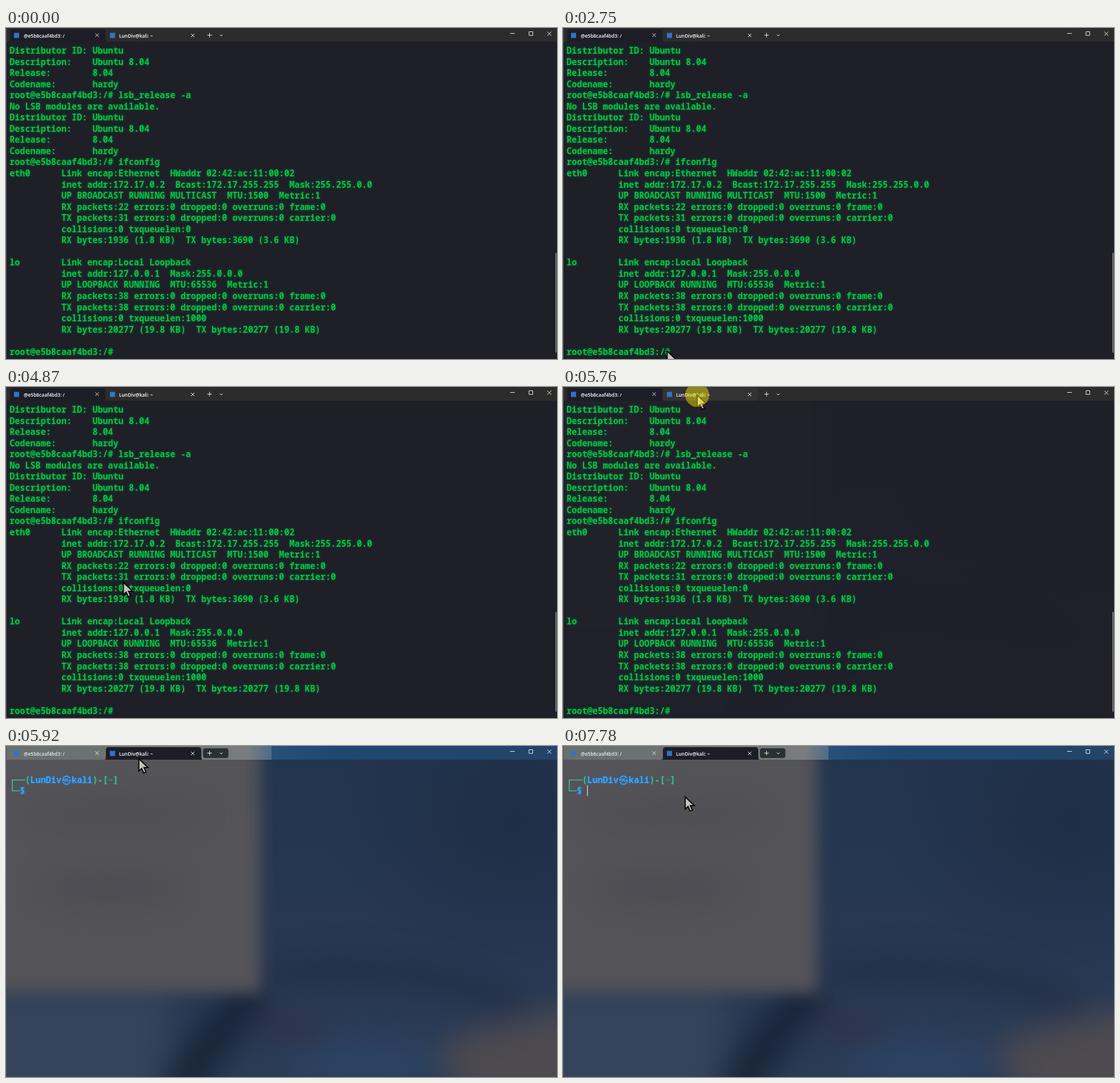
Animation, 965 px wide and 580 px high, one loop 8 s. Source, as an HTML page:

```html
<!DOCTYPE html>
<html lang="en">
<head>
<meta charset="utf-8">
<title>Terminal</title>
<style>
  html, body { margin: 0; width: 965px; height: 580px; overflow: hidden; background: #1f1f28; }
  svg, pre { position: absolute; left: 0; top: 0; margin: 0; }
  filter { color-interpolation-filters: sRGB; }
  pre {
    left: 6.2px; top: 30px; color: #04c445;
    font: bold 15.13px/19.55px "Noto Sans Mono", "DejaVu Sans Mono", monospace;
    text-shadow: 0 0 4px rgba(0, 160, 55, .6);
  }
  #kali { color: #34c88b; text-shadow: 0 0 4px rgba(40, 150, 150, .6); }
  #kali b { color: #38a8ff; text-shadow: 0 0 4px rgba(40, 130, 230, .7); }
  #kali i { font-style: normal; font-weight: 400; opacity: .75; }
  #kali .wide {
    display: inline-block; width: 18.16px; height: 19.55px; vertical-align: top; text-align: center;
    font: bold 16px/19.55px "Noto Sans CJK KR", "Noto Sans CJK JP", "Noto Sans CJK SC", sans-serif;
  }
  .tab { font: 600 8.4px "Open Sans", "Noto Sans", sans-serif; fill: #fff; }
  .line { fill: none; stroke: #f0f0f0; stroke-width: 1; }
</style>
</head>
<body>
<svg id="glass" width="965" height="580">
  <defs>
    <filter id="soft" x="-40%" y="-40%" width="180%" height="180%"><feGaussianBlur stdDeviation="26"/></filter>
    <filter id="edge" x="-20%" y="-20%" width="140%" height="140%"><feGaussianBlur stdDeviation="13"/></filter>
    <linearGradient id="sky" x2="0" y2="1">
      <stop stop-color="#22354f"/><stop offset=".6" stop-color="#283853"/><stop offset="1" stop-color="#2b3c56"/>
    </linearGradient>
    <radialGradient id="shade">
      <stop stop-color="#1d2c43" stop-opacity=".8"/><stop offset="1" stop-color="#1d2c43" stop-opacity="0"/>
    </radialGradient>
    <linearGradient id="top">
      <stop stop-color="#68706f"/><stop offset=".2" stop-color="#6e7273"/><stop offset=".44" stop-color="#7a7c7f"/>
      <stop offset=".482" stop-color="#4d6d88"/><stop offset=".482" stop-color="#27507a"/>
      <stop offset=".6" stop-color="#1f486f"/><stop offset="1" stop-color="#234468"/>
    </linearGradient>
  </defs>
  <rect width="965" height="580" fill="url(#sky)"/>
  <ellipse cx="890" cy="130" rx="330" ry="270" fill="url(#shade)"/>
  <g filter="url(#soft)">
    <rect x="-80" y="420" width="360" height="240" fill="#35445a"/>
    <ellipse cx="630" cy="560" rx="130" ry="45" fill="#2c4363"/>
    <path d="M460 400Q700 370 900 450" fill="none" stroke="#222c42" stroke-width="34"/>
    <ellipse cx="500" cy="490" rx="60" ry="25" fill="#30324a"/>
    <path d="M440 430Q370 490 295 620" fill="none" stroke="#172235" stroke-width="60"/>
    <path d="M755 530Q820 490 1040 450V660H830Z" fill="#4d4a50"/>
  </g>
  <rect x="-60" y="-60" width="506" height="492" fill="#545358" filter="url(#edge)"/>
  <g filter="url(#soft)" fill="#47484f" opacity=".6">
    <ellipse cx="180" cy="250" rx="130" ry="30"/><ellipse cx="190" cy="120" rx="160" ry="22"/>
  </g>
  <rect width="965" height="24" fill="url(#top)"/>
</svg>

<pre id="shell">Distributor ID: Ubuntu
Description:    Ubuntu 8.04
Release:        8.04
Codename:       hardy
root@e5b8caaf4bd3:/# lsb_release -a
No LSB modules are available.
Distributor ID: Ubuntu
Description:    Ubuntu 8.04
Release:        8.04
Codename:       hardy
root@e5b8caaf4bd3:/# ifconfig
eth0      Link encap:Ethernet  HWaddr 02:42:ac:11:00:02
          inet addr:172.17.0.2  Bcast:172.17.255.255  Mask:255.255.0.0
          UP BROADCAST RUNNING MULTICAST  MTU:1500  Metric:1
          RX packets:22 errors:0 dropped:0 overruns:0 frame:0
          TX packets:31 errors:0 dropped:0 overruns:0 carrier:0
          collisions:0 txqueuelen:0
          RX bytes:1936 (1.8 KB)  TX bytes:3690 (3.6 KB)

lo        Link encap:Local Loopback
          inet addr:127.0.0.1  Mask:255.0.0.0
          UP LOOPBACK RUNNING  MTU:65536  Metric:1
          RX packets:38 errors:0 dropped:0 overruns:0 frame:0
          TX packets:38 errors:0 dropped:0 overruns:0 carrier:0
          collisions:0 txqueuelen:1000
          RX bytes:20277 (19.8 KB)  TX bytes:20277 (19.8 KB)

root@e5b8caaf4bd3:/#</pre>

<pre id="kali"> 
   (<b>LunDiv<span class="wide">㉿</span>kali</b>)-[<i>~</i>]
  <b>$</b></pre>

<svg width="965" height="580">
  <rect id="bar" width="965" height="24" fill="#2c2c2c"/>
  <rect width="1" height="580" fill="#46585f"/>
  <rect id="hover" x="175" y="2" width="167" height="22" rx="5" fill="#fff" opacity=".03"/>
  <path id="active" d="M4 24Q7 24 7 20V7Q7 2 12 2H169Q174 2 174 7V20Q174 24 177 24Z" fill="#1d1d27"/>
  <rect id="button" x="345" y="4" width="44.500" height="17" rx="4" fill="#2d3033"/>
  <g fill="#2f74c8"><rect x="14" y="8.500" width="9" height="9"/><rect x="182" y="8.500" width="9" height="9"/></g>
  <text id="tab1" class="tab" x="31" y="17">@e5b8caaf4bd3: /</text>
  <text id="tab2" class="tab" x="198" y="17">LunDiv@kali: ~</text>
  <path class="line" d="M156.500 9.500l6 6m0-6l-6 6M324 10l6 6m0-6l-6 6M352.500 12.500h8m-4-4v8M374.500 11.500l2.500 2.500 2.500-2.500M883 9.500h8M916 6.500h6.500v6.500h-6.500zM948 6.500l7 7m0-7l-7 7"/>
  <rect id="scroll" x="962.500" y="394" width="1.500" height="175" rx=".7" fill="#a0a0a0"/>
  <path id="corner" d="M34 59.500H11V78.500H24.500" fill="none" stroke="#34c88b" stroke-width="1.600"/>
  <rect id="caret" width="1.500" height="19" fill="#c4c8c8"/>
  <path id="pointer" d="M1 1V22.500L6 18L9.500 26L13.500 24.300L10 16.500H17Z" fill="#c4c3bd" stroke="#080808" stroke-width="2"/>
  <circle id="click" cx="235" cy="14" r="21" fill="#ffeb00" opacity=".46"/>
</svg>

<script>
const LOOP = 8000, PRESS = 5760, FOCUS = 5880, SWITCH = 5920;
const el = id => document.getElementById(id);
const show = (id, on) => el(id).style.display = on ? "" : "none";

// Pointer moves: start, end, steps, from, to, optional curve control, optional ease power
const moves = [
  [1410, 1890, 8, [173, 582], [158, 565]],
  [2150, 2290, 3, [158, 565], [181, 565]],
  [2750, 3500, 11, [182, 565], [107, 563], null, 2],
  [3560, 4330, 12, [109, 563], [11, 564]],
  [4590, 5340, 12, [11, 564], [252, 21], [323, 300]],
  [5410, 5480, 2, [252, 21], [234, 13]],
  [SWITCH, 6470, 9, [234, 13], [213, 88]]
];

function pointerAt(t) {
  const move = moves.filter(m => t >= m[0]).pop();
  if (!move) return null;
  const [start, end, steps, from, to, control, power = 1] = move;
  const step = Math.min(steps, 1 + Math.floor((t - start) / (end - start) * (steps - 1) + 1e-6));
  const s = (step / steps) ** power;
  return from.map((a, i) => {
    const mid = control ? control[i] : (a + to[i]) / 2;
    return (1 - s) ** 2 * a + 2 * s * (1 - s) * mid + s * s * to[i];
  });
}

function draw(t) {
  const focused = t >= FOCUS, second = t >= SWITCH;
  el("glass").style.opacity = t < PRESS ? 0 : !focused ? .04 : !second ? .95 : 1;
  show("bar", !focused);
  show("button", focused);
  show("hover", t >= 5410 && !second);
  el("active").setAttribute("transform", `translate(${second ? 168 : 0})`);
  el("tab1").style.opacity = second ? .85 : 1;
  el("tab2").style.opacity = focused && !second ? .85 : 1;
  for (const id of ["shell", "scroll"]) show(id, !second);
  for (const id of ["kali", "corner"]) show(id, second);

  const blink = t >= 7080 && t < 7640 || t >= 7780;
  show("caret", focused && !second || blink);
  el("caret").setAttribute("x", second ? 42 : 196.5);
  el("caret").setAttribute("y", second ? 68.5 : 557.5);

  const pos = pointerAt(t);
  show("pointer", pos);
  if (pos) el("pointer").setAttribute("transform", `translate(${pos})`);
  show("click", t >= PRESS && !focused);
}

const begin = performance.now();
function tick() {
  draw((performance.now() - begin) % LOOP);
  requestAnimationFrame(tick);
}
tick();
</script>
</body>
</html>
```
